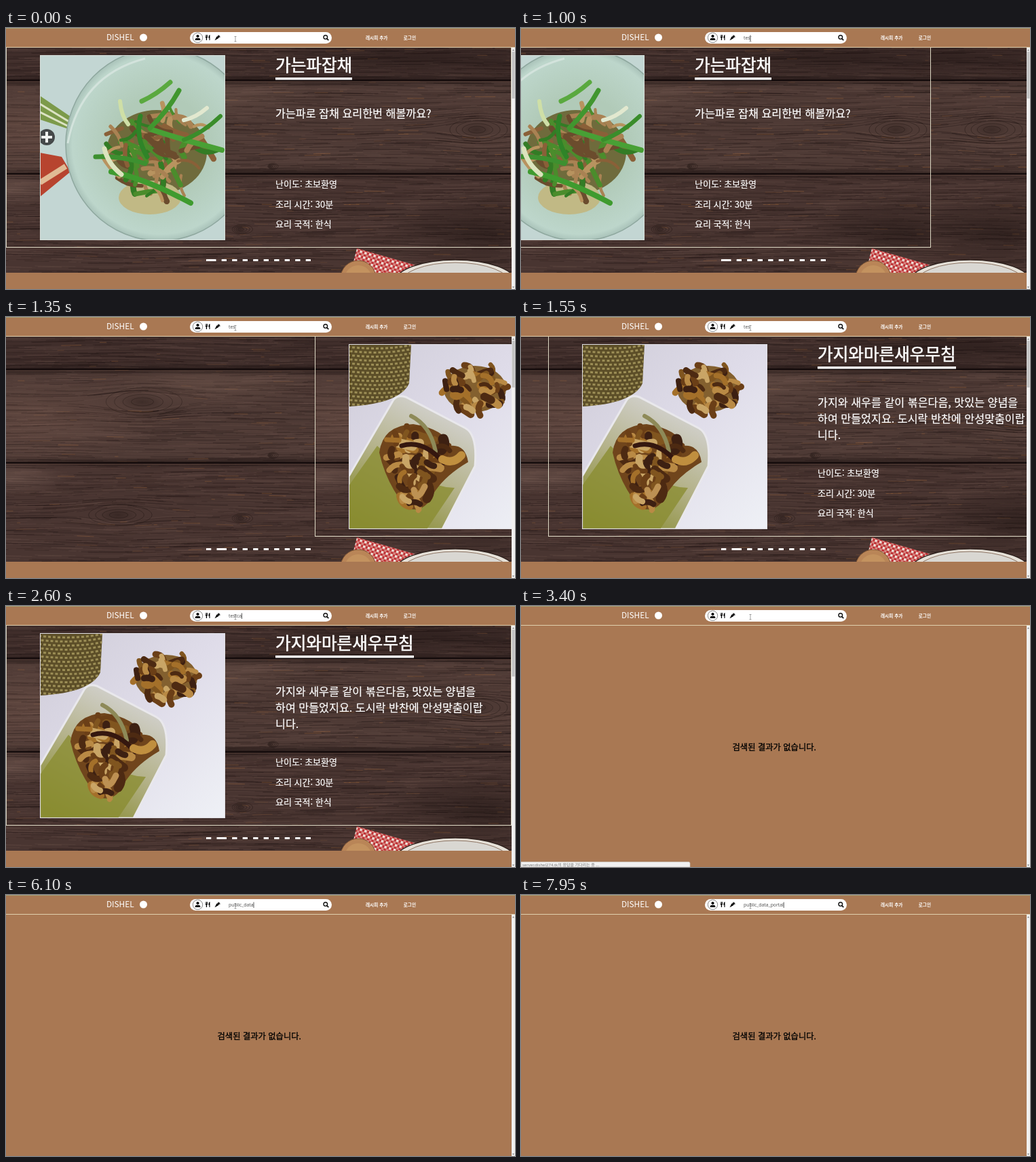
An HTML page with a canvas that plays this animation: 750x385 px, repeating every 8 s.

```html
<!DOCTYPE html>
<html lang="ko">
<head>
<meta charset="utf-8">
<title>Recipe search</title>
<style>
html, body { margin: 0; width: 100%; height: 100%; overflow: hidden; background: #a97853; }
#stage, #stage > *, #home > *, .slide > * { position: absolute; left: 0; top: 0; }
#stage { width: 750px; height: 385px; overflow: hidden; background: #a97853; }
#home { width: 745px; height: 361px; overflow: hidden; }
.slide { width: 745px; height: 324px; overflow: hidden; }
svg { display: block; }
text { font-family: "Noto Sans CJK KR", "Noto Sans CJK JP", "Noto Sans CJK", sans-serif; white-space: pre; }
.latin { font-family: "Noto Sans", "Open Sans", sans-serif; }
.copy { fill: #fff; }
.copy text { stroke: #fff; stroke-width: .2; }
.copy .title { font-size: 24.6px; font-weight: 500; stroke-width: .6; }
.desc { font-size: 16.2px; }
.meta { font-size: 13px; }
#empty { font-size: 12.3px; font-weight: 500; stroke: #000; stroke-width: .3; }
</style>
</head>
<body>
<div id="stage">
  <div id="home">
    <canvas class="wood" width="745" height="361"></canvas>
    <svg width="745" height="361">
      <defs>
        <pattern id="check" width="7" height="7" patternUnits="userSpaceOnUse" patternTransform="rotate(17)">
          <rect width="7" height="7" fill="#bd2f33"/>
          <path d="M0 0h3.500v3.500h-3.500zM3.500 3.500h3.500v3.500h-3.500z" fill="#d88882"/>
          <path d="M0 0h3.500v3.500h-3.500z" fill="#efe2da"/>
        </pattern>
      </defs>
      <path d="M517 325L604 350L590 361H508Z" fill="url(#check)"/>
      <circle cx="519" cy="369" r="26" fill="#b98557" stroke="#7d5434"/>
      <circle cx="519" cy="370" r="20" fill="#c3925f"/>
      <ellipse cx="662" cy="375" rx="89" ry="33" fill="#e6e1d8" stroke="#2e211d" stroke-width="1.5"/>
      <ellipse cx="662" cy="378" rx="82" ry="32" fill="#d9d7d2" stroke="#8d7463"/>
    </svg>
    <div class="slide" id="first">
      <canvas class="wood" width="745" height="324"></canvas>
      <svg width="745" height="324">
        <clipPath id="photo"><rect x="50" y="40" width="273" height="273"/></clipPath>
        <radialGradient id="glass">
          <stop offset=".5" stop-color="#b1cab8"/><stop offset=".93" stop-color="#bdd6cb"/><stop offset="1" stop-color="#a9c2b9"/>
        </radialGradient>
        <g clip-path="url(#photo)">
          <rect x="50" y="40" width="273" height="273" fill="#c3d6d3"/>
          <path d="M50 100L97 132L95 150L50 135Z" fill="#7c9a4a"/>
          <path d="M50 112L96 140M50 124L94 146" stroke="#dce3c4" stroke-width="3"/>
          <path d="M50 184L82 190L95 212L50 249Z" fill="#b7442f"/>
          <path d="M50 228L88 204" stroke="#e0bb95" stroke-width="8"/>
          <circle cx="60" cy="161" r="12" fill="#45494a"/>
          <path d="M52 161h16M60 153v16" stroke="#f1f3f1" stroke-width="4"/>
          <ellipse cx="227" cy="172" rx="139" ry="142" fill="url(#glass)" stroke="#8fa89f" stroke-width="1.5"/>
          <path d="M91 170C103 105 140 62 205 45" fill="none" stroke="#d3e3dc" stroke-width="3"/>
          <g id="noodles"></g>
        </g>
        <rect x="50.5" y="40.5" width="272" height="272" fill="none" stroke="#d7dfda"/>
        <g class="copy">
          <text class="title" x="397" y="64">가는파잡채</text>
          <rect x="397" y="73" width="113" height="3.5"/>
          <text class="desc" x="397" y="132">가는파로 잡채 요리한번 해볼까요?</text>
          <g class="facts"></g>
        </g>
        <rect x=".5" y="28.5" width="744" height="295" fill="none" stroke="#ddd8c4"/>
      </svg>
    </div>
    <div class="slide" id="second">
      <canvas class="wood" width="745" height="324"></canvas>
      <svg width="745" height="324">
        <linearGradient id="cloth" x2="1" y2="1">
          <stop stop-color="#cfccd8"/><stop offset=".5" stop-color="#dfdce9"/><stop offset="1" stop-color="#eff1f6"/>
        </linearGradient>
        <linearGradient id="tray" x1=".7" y1="0" x2=".2" y2="1">
          <stop stop-color="#d6d5d6"/><stop offset=".5" stop-color="#b5b38c"/><stop offset="1" stop-color="#85892c"/>
        </linearGradient>
        <clipPath id="rim"><path d="M50 40H142L139 98Q125 128 50 132Z"/></clipPath>
        <g clip-path="url(#photo)">
          <rect x="50" y="40" width="273" height="273" fill="url(#cloth)"/>
          <g id="basket" clip-path="url(#rim)"><rect x="50" y="40" width="95" height="95" fill="#5c4e28"/></g>
          <path d="M50 235L116 122Q122 114 134 118L222 164Q240 174 236 220L188 313H50Z" fill="url(#tray)" stroke="#e9e8ec" stroke-width="3"/>
          <path d="M50 249L92 190Q150 250 206 252L165 313H50Z" fill="#8b8e33" opacity=".8"/>
          <g id="fritters"></g>
        </g>
        <rect x="50.5" y="40.5" width="272" height="272" fill="none" stroke="#dedde2"/>
        <g class="copy">
          <text class="title" x="397" y="64">가지와마른새우무침</text>
          <rect x="397" y="73" width="204" height="3.5"/>
          <text class="desc" x="397" y="132">가지와 새우를 같이 볶은다음, 맛있는 양념을</text>
          <text class="desc" x="397" y="156">하여 만들었지요. 도시락 반찬에 안성맞춤이랍</text>
          <text class="desc" x="397" y="180">니다.</text>
          <g class="facts"></g>
        </g>
        <rect x=".5" y="28.5" width="744" height="295" fill="none" stroke="#ddd8c4"/>
      </svg>
    </div>
    <svg width="745" height="361"><g id="dots" fill="#fff"></g></svg>
  </div>

  <svg width="750" height="385">
    <text id="empty" x="311.5" y="212.7">검색된 결과가 없습니다.</text>
    <rect width="750" height="28" fill="#a97853"/>
    <rect width="750" height="1" fill="#a5a179"/>
    <rect y="28" width="750" height="1" fill="#dfcfae"/>
    <text x="148" y="18.2" font-size="11.8" fill="#fff">DISHEL</text>
    <circle cx="202.5" cy="14" r="5.5" fill="#fff"/>
    <rect x="271" y="6" width="209" height="17" rx="8.5" fill="#fff"/>
    <g id="icons">
      <circle cx="282.5" cy="14.3" r="7.2" fill="#fff" stroke="#555" stroke-width=".7"/>
      <circle cx="282.5" cy="12.1" r="2.1"/>
      <path d="M278.700 18v-1q0-2 2-2h3.600q2 0 2 2v1z"/>
      <path d="M293.800 10v3q0 1.500 1 1.800V18h1.300v-3.200q1-.3 1-1.800V10h-.8v2.700h-.6V10h-.7v2.700h-.6V10zM300.500 10q-2 .4-2 4v1h.9v3h1.100z"/>
      <path d="M307.600 18.200L310.200 12.900Q312 11.300 313.500 13.500Q313.600 14.800 312.500 15.600Z"/>
      <path d="M312.500 13.500L313 10.500M312.500 13.500L315.600 13M312.500 13.500L314.700 11.300" stroke="#000" stroke-width="1.2"/>
      <circle cx="470.8" cy="13.6" r="2.8" fill="none" stroke="#111" stroke-width="1.4"/>
      <path d="M472.800 15.700L475.300 18.200" stroke="#111" stroke-width="1.7"/>
    </g>
    <g fill="#fff" font-size="6.65" font-weight="700">
      <text x="530" y="17.4">레시피 추가</text>
      <text x="585.7" y="17.4">로그인</text>
    </g>
    <text id="query" class="latin" x="328" y="17.4" font-size="6.8" fill="#555"></text>
    <rect id="caret" y="10.5" width=".8" height="8.5" fill="#333"/>
    <path d="M336.500 12.500h3M338 12.500v7.500M336.500 20h3" fill="none" stroke="#888" stroke-width=".8"/>
    <rect x="745" y="29" width="5" height="356" fill="#f0f0f0"/>
    <path d="M746 33.500L747.500 31.500L749 33.500ZM746 381.500L747.500 383.500L749 381.500Z" fill="#777"/>
    <rect id="thumb" x="745.5" y="35" width="4" height="69" fill="#c1c1c1"/>
    <g id="status">
      <path d="M0 377.500H247Q249 377.500 249 379.500V385H0Z" fill="#f1f1f1" stroke="#c9c5c0" stroke-width=".6"/>
      <text class="latin" x="2" y="383.6" font-size="6" fill="#777">server.dishel274.tk의 응답을 기다리는 중 ...</text>
    </g>
  </svg>
</div>

<script>
const LOOP = 8000, STEP = 50, SEARCH_AT = 3250;
const SLIDE = { start: 851, duration: 777, travel: 1604 };
const $ = id => document.getElementById(id);

function seeded(seed) {
  return () => (seed = (seed * 16807) % 2147483647) / 2147483647;
}

// Dark planks with fine grain bent around knots, then soft light and shade.
function paintWood(canvas) {
  const c = canvas.getContext('2d'), rnd = seeded(4217);
  const edges = [28, 77, 215, 361];
  const knots = [[200, 125, 66, 24], [693, 150, 50, 20], [345, 297, 18, 8], [165, 292, 55, 18], [390, 204, 9, 5]];
  const inks = ['rgba(20,12,12,.36)', 'rgba(28,17,16,.3)', 'rgba(118,92,84,.3)', 'rgba(106,80,72,.24)'];
  const bend = (x, y) => {
    let d = 1.5 * Math.sin(x / 75 + y / 19);
    for (const [kx, ky, rx, ry] of knots) {
      const u = (x - kx) / rx, v = (y - ky) / ry;
      d += Math.sign(v || 1) * ry * .55 * Math.exp(-u * u - Math.abs(v));
    }
    return y + d;
  };
  const glow = (x, y, rx, ry, rgb, alpha) => {
    c.save();
    c.translate(x, y);
    c.scale(rx, ry);
    const g = c.createRadialGradient(0, 0, 0, 0, 0, 1);
    g.addColorStop(0, `rgba(${rgb},${alpha})`);
    g.addColorStop(1, `rgba(${rgb},0)`);
    c.fillStyle = g;
    c.fillRect(-1, -1, 2, 2);
    c.restore();
  };
  const grain = (top, bottom, count, maxLength, pick) => {
    for (let i = 0; i < count; i++) {
      const x = rnd() * 800 - 60, y = top + rnd() * (bottom - top), len = maxLength * (.2 + .8 * rnd());
      c.strokeStyle = pick();
      c.lineWidth = .4 + rnd() * .6;
      c.beginPath();
      for (let s = 0; s <= len; s += 5) c.lineTo(x + s, bend(x + s, y));
      c.stroke();
    }
  };
  for (let i = 0; i < 3; i++) {
    const top = edges[i], bottom = edges[i + 1], height = bottom - top;
    c.save();
    c.beginPath();
    c.rect(0, top, 745, height);
    c.clip();
    c.fillStyle = ['#402e2b', '#4e3a35', '#493531'][i];
    c.fillRect(0, top, 745, height);
    grain(top, bottom, height * 10, 110, () => inks[Math.floor(rnd() * inks.length)]);
    grain(top, bottom, height * .5, 34, () => 'rgba(160,104,60,.5)');
    c.restore();
  }
  for (const [x, y, rx, ry] of knots) {
    for (let k = .25; k < 1; k += .2) {
      c.strokeStyle = 'rgba(24,14,13,.45)';
      c.lineWidth = .8;
      c.beginPath();
      c.ellipse(x + 4 * k, y, rx * k, ry * k, 0, 0, 7);
      c.stroke();
    }
    glow(x, y, rx * .5, ry * .5, '25,15,13', .35);
  }
  glow(40, 150, 190, 70, '138,103,90', .3);
  glow(10, 238, 80, 26, '150,120,108', .35);
  glow(300, 100, 160, 34, '138,108,94', .28);
  glow(700, 300, 150, 60, '18,10,9', .4);
  glow(600, 45, 260, 30, '18,10,9', .35);
  for (const y of edges.slice(1, 3)) {
    glow(372, y, 800, 9, '15,8,8', .6);
    c.fillStyle = '#150c0c';
    c.fillRect(0, y - 1, 745, 2);
    c.fillStyle = 'rgba(125,94,80,.4)';
    c.fillRect(0, y + 2, 745, 1);
  }
}
document.querySelectorAll('.wood').forEach(paintWood);

const stalk = (d, color, width) =>
  `<path d="${d}" fill="none" stroke="${color}" stroke-width="${width}" stroke-linecap="round"/>`;

// Scattered curved strokes, piled inside an ellipse.
function pile(seed, count, cx, cy, rx, ry, colors, width, length, lean) {
  const rnd = seeded(seed);
  let out = '';
  for (let i = 0; i < count; i++) {
    const a = rnd() * 6.283, r = Math.sqrt(rnd());
    const x = cx + rx * r * Math.cos(a), y = cy + ry * r * Math.sin(a);
    const turn = lean + (rnd() - .5) * 2.4, l = length * (.5 + rnd() * .5);
    const dx = l * Math.cos(turn), dy = l * Math.sin(turn), k = (rnd() - .5) * 1.6;
    out += stalk(`M${x - dx} ${y - dy}Q${x - dy * k} ${y + dx * k} ${x + dx} ${y + dy}`,
      colors[i % colors.length], width * (.5 + rnd() * .6));
  }
  return out;
}

$('noodles').innerHTML =
  '<ellipse cx="222" cy="183" rx="74" ry="62" fill="#6f6b3c"/>' +
  '<ellipse cx="212" cy="250" rx="46" ry="25" fill="#c1b985"/>' +
  pile(91, 70, 222, 178, 76, 66, ['#8a6038', '#a98253', '#4b8c2c', '#6b4c2d', '#337c25', '#b8935f'], 8, 20, .4) +
  stalk('M155 212Q205 222 272 258', '#3f9b2f', 8) +
  stalk('M215 150Q260 165 318 180', '#48a035', 8) +
  stalk('M198 130Q190 160 208 190', '#2f8428', 7) +
  stalk('M255 92Q240 120 212 148', '#41962f', 7) +
  stalk('M242 80Q222 98 200 108', '#5aa93f', 7) +
  stalk('M262 165Q290 155 316 130', '#3a8d2b', 6) +
  stalk('M132 190Q170 188 205 200', '#3d9030', 7) +
  stalk('M145 178Q150 200 170 216', '#dbe3bd', 7) +
  stalk('M168 108Q170 130 180 142', '#cfdfa6', 6) +
  stalk('M262 136Q280 132 296 118', '#e2e8cf', 6);

for (let y = 44, row = 0; y < 132; y += 6, row++) {
  $('basket').insertAdjacentHTML('beforeend',
    `<path d="M48 ${y}Q100 ${y + 6} 144 ${y - 3}" fill="none" stroke="#9c8e56" stroke-width="3" stroke-dasharray="4 3" stroke-dashoffset="${row % 2 * 3.5}"/>`);
}

const fried = ['#6b3f17', '#a4702a', '#3d2012', '#b98a45', '#80551f', '#c9a566', '#4d2a12'];
$('fritters').innerHTML =
  '<ellipse cx="236" cy="106" rx="46" ry="34" fill="#83602f"/>' +
  pile(53, 45, 236, 106, 44, 36, fried, 11, 9, .5) +
  '<path d="M95 200Q100 160 145 158Q190 165 200 190Q222 188 226 214Q190 235 174 262Q162 290 135 282Q105 245 95 200Z" fill="#70451c"/>' +
  pile(37, 45, 152, 200, 46, 34, fried, 14, 11, .7) +
  pile(71, 22, 148, 246, 24, 34, fried, 13, 11, 1) +
  stalk('M142 146Q170 160 178 198', '#8e8a58', 6) +
  stalk('M128 190Q160 180 190 215', '#35170f', 7) +
  stalk('M188 210Q204 218 216 204', '#c08f3f', 12) +
  stalk('M146 255Q150 275 162 250', '#bd9153', 9);

document.querySelectorAll('.facts').forEach(g => {
  g.innerHTML = ['난이도: 초보환영', '조리 시간: 30분', '요리 국적: 한식']
    .map((s, i) => `<text class="meta" x="397" y="${235 + i * 29.5}">${s}</text>`).join('');
});

const dots = Array.from({ length: 10 }, () => {
  const dot = document.createElementNS('http://www.w3.org/2000/svg', 'rect');
  dot.setAttribute('y', 341);
  dot.setAttribute('height', 3);
  return $('dots').appendChild(dot);
});
function markDot(active) {
  let x = 295;
  dots.forEach((dot, i) => {
    const width = i === active ? 14.5 : 7.3;
    dot.setAttribute('x', x);
    dot.setAttribute('width', width);
    x += width + 8.2;
  });
}

// [start, interval, text]: one letter per interval
const typing = [[200, 150, 'tes'], [2150, 175, 'tcase'], [4500, 140, 'public'], [5600, 125, '_data'], [6550, 125, '_portal']];
const caretOn = [[200, 800], [950, 1300], [1650, 2000], [2150, 3250], [4350, 5500], [5600, 6450], [6550, 7600], [7950, 8000]];

function typedText(t) {
  return typing
    .filter(([start]) => start <= t && (t < SEARCH_AT || start > SEARCH_AT))
    .map(([start, gap, s]) => s.slice(0, Math.floor((t - start) / gap) + 1)).join('');
}
const clamp = v => Math.min(1, Math.max(0, v));
const show = (el, on) => { el.style.visibility = on ? 'visible' : 'hidden'; };

function render(t) {
  const p = clamp((t - SLIDE.start) / SLIDE.duration);
  const shift = Math.round(SLIDE.travel * (1 - Math.cos(Math.PI * p)) / 2);
  $('first').style.left = `${-shift}px`;
  $('second').style.left = `${SLIDE.travel - shift}px`;
  markDot(t < 1250 ? 0 : 1);

  const searched = t >= SEARCH_AT;
  $('home').style.display = searched ? 'none' : '';
  show($('empty'), searched);
  show($('thumb'), !searched);
  $('status').style.opacity = searched ? clamp((4050 - t) / 150) : 0;

  const query = $('query');
  query.textContent = typedText(t);
  $('caret').setAttribute('x', 328 + (query.textContent ? query.getComputedTextLength() : 0));
  show($('caret'), caretOn.some(([from, to]) => t >= from && t < to));
}

let last = -1;
function frame() {
  const t = Math.floor(performance.now() % LOOP / STEP) * STEP;
  if (t !== last) render(last = t);
  requestAnimationFrame(frame);
}
frame();
</script>
</body>
</html>
```
